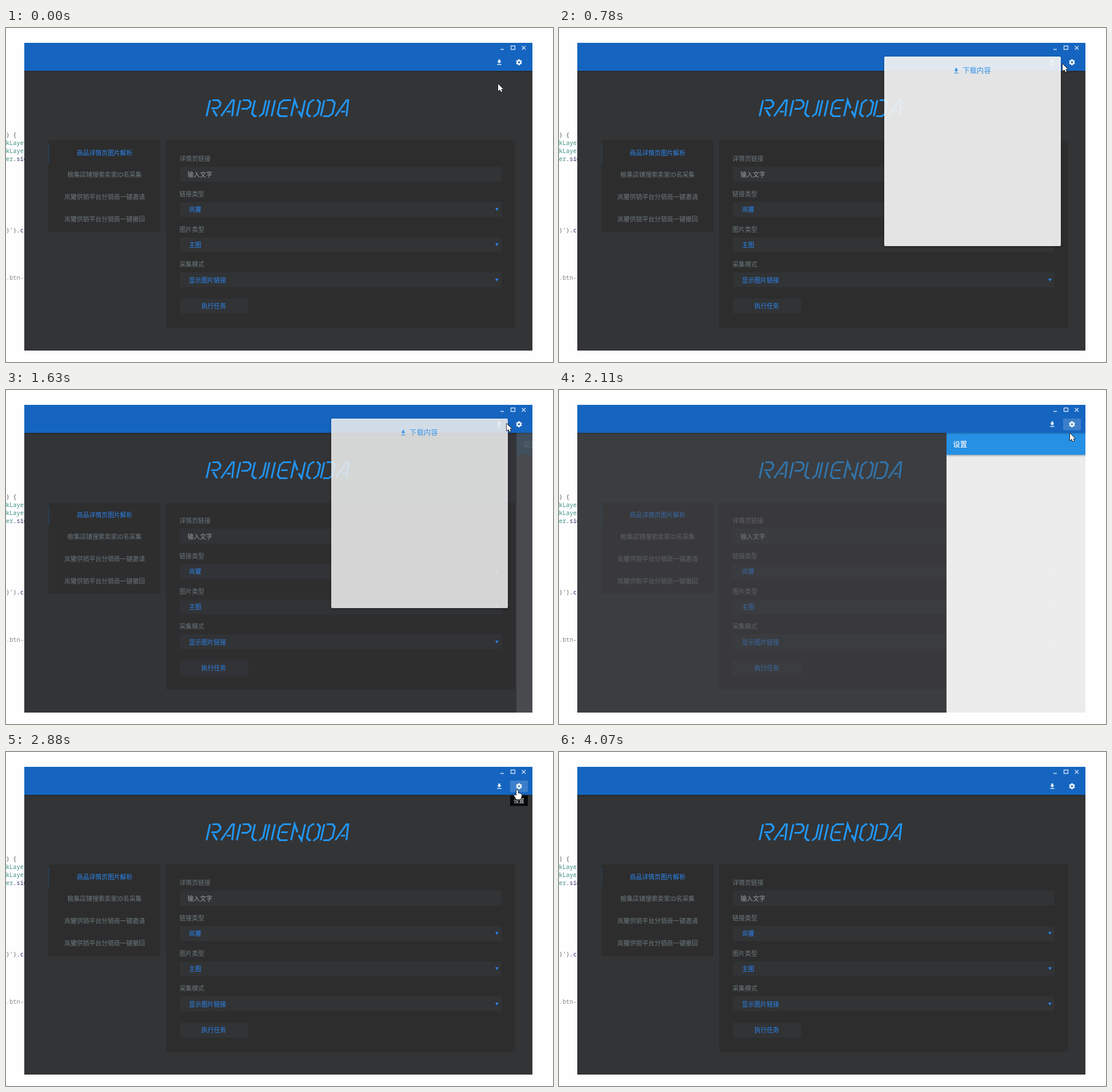
Animation, 957 px wide and 585 px high, one loop 4540 ms. Source, as an HTML page with a canvas:

```html
<!DOCTYPE html>
<html lang="zh-CN">
<head>
<meta charset="utf-8">
<title>Rapullenoda</title>
<style>
  html, body { margin: 0; width: 957px; height: 585px; overflow: hidden; background: #fefefe; }
  canvas { display: block; }
</style>
</head>
<body>
<canvas id="stage" width="957" height="585"></canvas>
<script>
const ctx = document.getElementById('stage').getContext('2d');
const LOOP = 4540;
const CJK = '"Noto Sans CJK SC", "Noto Sans CJK", "Noto Sans", sans-serif';
const BLUE = '#2c86f0', LABEL = '#6d797f', FIELD = '#313335';

// Bursts of movement: start, end, number of steps. The picture rests in between.
const bursts = [[240, 720, 9], [780, 1290, 9], [1350, 1820, 10], [1880, 2360, 9],
  [2420, 2940, 9], [3000, 3430, 8], [3550, 4070, 10]];

const popupTrack = [[420, 0], [480, .3], [600, .85], [660, .94], [720, .94], [780, .88],
  [844, .45], [930, 0], [1500, 0], [1559, .45], [1611, .81], [1715, .94], [1820, .94],
  [1880, .85], [1940, .4], [2000, 0]];
const drawerTrack = [[971, 0], [1035, .3], [1099, .67], [1162, .88], [1290, 1],
  [1350, .95], [1454, .6], [1559, .24], [1611, .113], [1680, 0],
  [1940, 0], [2000, .5], [2060, .86], [2120, .98], [2180, 1],
  [2480, 1], [2615, .5], [2745, 0], [3000, 0], [3060, .35], [3185, .85], [3310, 1],
  [3600, 1], [3730, .5], [3860, 0]];
const cursorX = [[240, 861], [420, 863], [600, 865], [720, 876], [780, 881], [907, 892],
  [1162, 888], [1350, 887], [1480, 866], [1611, 876], [1715, 872], [1880, 884], [2000, 894],
  [3430, 894], [3600, 894], [3850, 915], [4070, 950]];
const cursorY = [[240, 98], [420, 62], [780, 63], [907, 64], [1162, 65], [1350, 64],
  [1480, 61], [1611, 59], [1880, 62], [2000, 64], [2120, 76], [2480, 76], [2680, 66],
  [3185, 66], [3310, 78], [3600, 86], [3850, 320], [4070, 590]];
const handTimes = [[380, 520], [880, 1390], [1430, 1540], [1960, 2080], [2640, 3200]];
const gearTimes = [[880, 1390], [1960, 2470], [2640, 3250]];
const tipTimes = [[1000, 1380], [2800, 3200]];

const glyphs = {
  R: [25, 'M0 28V0M4 0H14L19 5V10L15 14H5M9 17L18 28'],
  A: [27, 'M0 28L13 0H16L19 28M8 20H15'],
  P: [25, 'M0 28V0M4 0H14L19 5V11L15 15H5'],
  U: [25, 'M0 0V23L5 28H9M13 28H14L19 23V0'],
  I: [9.5, 'M0 0V28'],
  E: [24, 'M18 0H5L0 5V23L5 28H18M4 14H15'],
  N: [26, 'M0 28V0L8 14M11 19L18 28V0'],
  O: [25, 'M8 0H5L0 5V23L5 28H8M12 0H14L19 5V23L14 28H12'],
  D: [25, 'M0 0V28M4 0H14L19 5V23L14 28H4']
};
const arrowPath = new Path2D('M0 0V12.5L3 9.8L5 14L7.2 13L5.3 9H9Z');
const handPath = new Path2D('M-1 1.5Q0 -.5 2 1.5V6L7 7.2Q8.5 8 8 12L6 17H-1L-5 10.5Q-4.5 8 -2.5 9.5L-1 10.5Z');
const downloadPath = new Path2D('M7 -3H3V-9H-3V-3H-7L0 4ZM-7 6V8.5H7V6Z');

function track(t, keys) {
  const i = keys.findIndex(k => k[0] > t);
  if (i < 0) return keys[keys.length - 1][1];
  if (i === 0) return keys[0][1];
  const [t0, a] = keys[i - 1], [t1, b] = keys[i];
  return a + (b - a) * (t - t0) / (t1 - t0);
}

const during = (t, spans) => spans.some(([a, b]) => t >= a && t < b);

function stepTime(t) {
  let shown = 0;
  for (const [start, end, count] of bursts) {
    if (t < start) break;
    const gap = (end - start) / (count - 1);
    shown = start + gap * Math.min(count - 1, Math.floor((t - start + 13) / gap));
  }
  return shown;
}

function rect(x, y, w, h, fill, radius = 0) {
  ctx.fillStyle = fill;
  ctx.beginPath();
  ctx.roundRect(x, y, w, h, radius);
  ctx.fill();
}

function text(str, x, y, fill, { size = 10.85, align = 'left', weight = 400, family = CJK } = {}) {
  ctx.font = `${weight} ${size}px ${family}`;
  ctx.textAlign = align;
  ctx.textBaseline = 'alphabetic';
  ctx.fillStyle = fill;
  ctx.fillText(str, x, y + size * .37);
}

function at(x, y, draw, scale = 1) {
  ctx.save();
  ctx.translate(x, y);
  ctx.scale(scale, scale);
  draw();
  ctx.restore();
}

function shadow(color, blur, y) {
  ctx.shadowColor = color;
  ctx.shadowBlur = blur;
  ctx.shadowOffsetY = y;
}

function download(x, y, fill) {
  at(x, y, () => { ctx.fillStyle = fill; ctx.fill(downloadPath); }, .53);
}

function gear(x, y) {
  at(x, y, () => {
    ctx.strokeStyle = ctx.fillStyle = '#fff';
    ctx.lineWidth = 2.2;
    ctx.beginPath();
    ctx.arc(0, 0, 2.9, 0, 7);
    ctx.stroke();
    for (let i = 0; i < 6; i++) {
      ctx.fillRect(-1.4, -5.2, 2.8, 2);
      ctx.rotate(Math.PI / 3);
    }
  });
}

function code() {
  const opts = { size: 10.3, family: '"Noto Sans Mono", "DejaVu Sans Mono", monospace' };
  text(') {', 0, 187.5, '#555', opts);
  text('kLaye', 0, 201.5, '#3e9080', opts);
  text('kLaye', 0, 215.5, '#3e9080', opts);
  text('er', 0, 229.5, '#3e9080', opts);
  text('.sid', 12.3, 229.5, '#26266e', opts);
  text(")')", 0, 354.5, '#666', opts);
  text('.cl', 18.5, 354.5, '#26266e', opts);
  text('.btn-l', 0, 437.5, '#858585', opts);
}

function title(word) {
  ctx.save();
  ctx.transform(1.02, 0, -.22, 1, 357, 126.5);
  ctx.strokeStyle = '#2196f3';
  ctx.lineWidth = 3.2;
  for (const letter of word) {
    const [advance, path] = glyphs[letter];
    ctx.stroke(new Path2D(path));
    ctx.translate(advance, 0);
  }
  ctx.restore();
}

function sidebar() {
  rect(74, 197, 196, 160, '#2d2d2d', 2);
  rect(74, 203, 1.4, 33, '#24445f');
  const items = ['商品详情页图片解析', '榆集店铺搜索卖家ID名采集', '岚獾供销平台分销商一键邀请', '岚獾供销平台分销商一键撤回'];
  items.forEach((item, i) =>
    text(item, 172.5, 218.5 + i * 38.7, i ? LABEL : BLUE, { align: 'center' }));
}

function form() {
  rect(280, 197, 611, 328, '#2d2d2d', 2);
  const rows = [['详情页链接', '输入文字'], ['链接类型', '岚獾'], ['图片类型', '主图'], ['采集模式', '显示图片链接']];
  rows.forEach(([label, value], i) => {
    const y = 229 + i * 61.8;
    text(label, 303.5, y, LABEL);
    rect(304, Math.round(y + 14), 563, 26, FIELD, 1);
    text(value, i ? 320 : 317.5, y + 27.5, i ? BLUE : '#9ba3a6');
    if (!i) return;
    ctx.fillStyle = BLUE;
    ctx.fill(new Path2D(`M856 ${y + 24.5}h5.6l-2.8 5z`));
  });
  rect(304, 474, 120, 26, FIELD, 1);
  text('执行任务', 363.5, 487, BLUE, { align: 'center' });
}

function drawer(p) {
  if (p <= 0) return;
  ctx.globalAlpha = .46 * p;
  rect(32, 75, 889, 490, '#48484c');
  const x = 921 - 248 * p;
  ctx.globalAlpha = p;
  rect(x, 75, 248, 490, '#f0f0f0');
  ctx.save();
  shadow('rgba(0,0,0,.35)', 3, 1);
  rect(x, 75, 248, 38.5, '#2490e6');
  ctx.restore();
  text('设置', x + 11.5, 95, '#dcebf8', { size: 12.4, weight: 700 });
  ctx.globalAlpha = 1;
}

function header(gearOn) {
  ctx.save();
  shadow('rgba(0,0,0,.3)', 3, 1);
  rect(32, 26, 889, 49, '#1565c0');
  ctx.restore();
  ctx.strokeStyle = '#d3e2f4';
  ctx.lineWidth = 1.3;
  ctx.stroke(new Path2D('M865 37.5H871M883.5 31.5H890.5V37.5H883.5ZM902.5 31.5L909 38M909 31.5L902.5 38'));
  if (gearOn) rect(882, 50, 31, 20.5, 'rgba(255,255,255,.17)', 1);
  download(863, 60, '#fff');
  gear(897.5, 60);
}

function popup(alpha) {
  if (alpha <= 0) return;
  ctx.globalAlpha = alpha;
  ctx.save();
  shadow('rgba(0,0,0,.4)', 4, 1);
  rect(569, 50, 309, 332, '#fff', 2);
  ctx.restore();
  download(695, 75, '#1e88e5');
  text('下载内容', 706, 74, '#1e88e5', { size: 12.4 });
  ctx.globalAlpha = 1;
}

function tooltip() {
  rect(882, 76, 31, 18.5, '#08090b', 1);
  text('设置', 897.5, 85.5, '#e8e8e8', { size: 9.4, align: 'center' });
}

function cursor(t) {
  const hand = during(t, handTimes), path = hand ? handPath : arrowPath;
  at(track(t, cursorX), track(t, cursorY), () => {
    ctx.lineWidth = 1.6;
    ctx.lineJoin = 'round';
    ctx.strokeStyle = '#111';
    ctx.stroke(path);
    ctx.fillStyle = '#fff';
    ctx.fill(path);
  });
}

function render(t) {
  rect(0, 0, 957, 585, '#fefefe');
  code();
  ctx.save();
  ctx.beginPath();
  ctx.rect(32, 26, 889, 539);
  ctx.clip();
  rect(32, 26, 889, 539, '#333436');
  title('RAPUIIENODA');
  sidebar();
  form();
  drawer(track(t, drawerTrack));
  header(during(t, gearTimes));
  popup(track(t, popupTrack));
  if (during(t, tipTimes)) tooltip();
  ctx.restore();
  if (t < 4060) cursor(t);
}

const began = performance.now();
function tick() {
  render(stepTime((performance.now() - began) % LOOP));
  requestAnimationFrame(tick);
}
tick();
</script>
</body>
</html>
```
